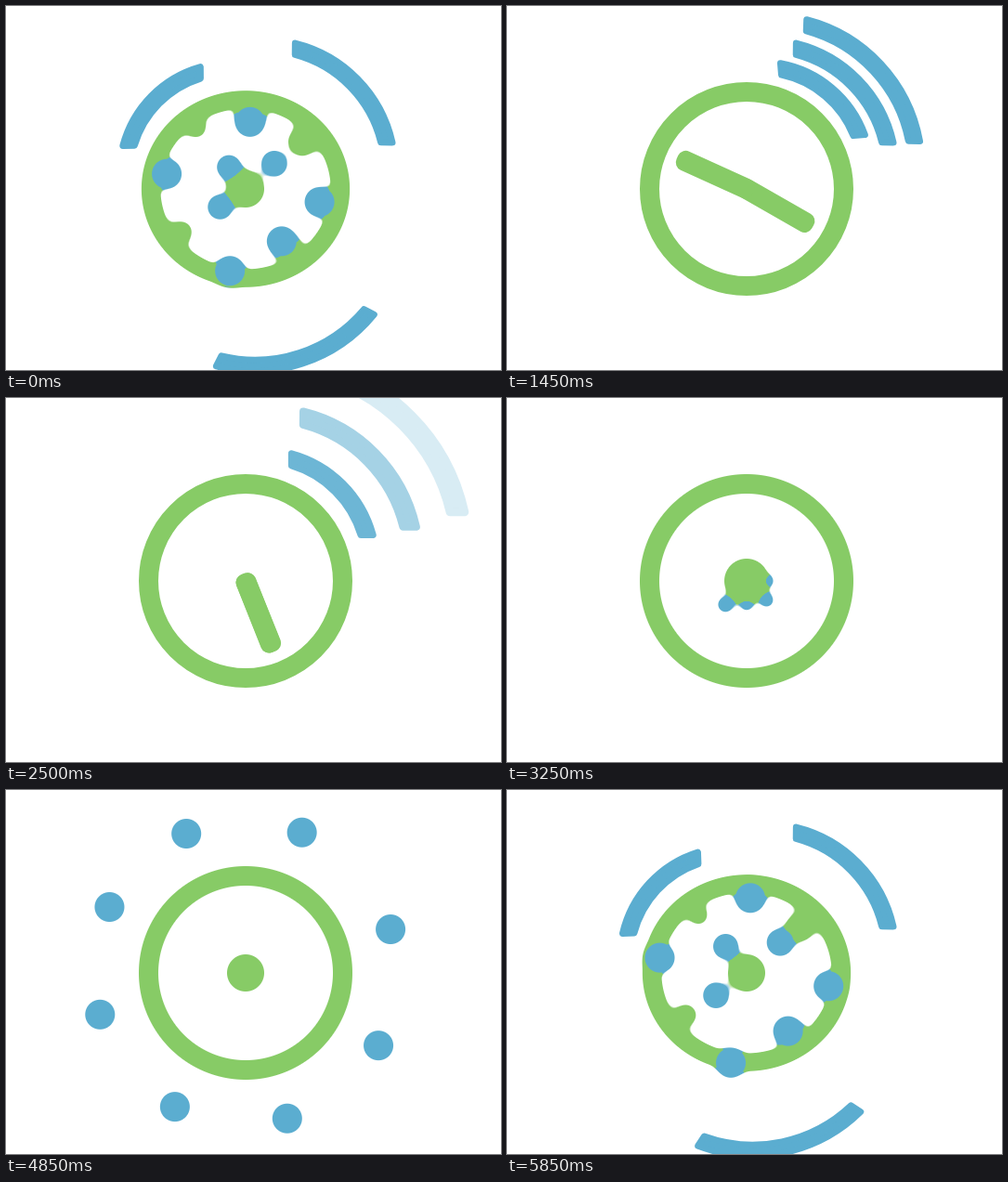
These frames come from a looping animation (533x392 px, 5900 ms). An HTML page with a canvas:

```html
<!DOCTYPE html>
<html lang="en">
<head>
<meta charset="utf-8">
<title>Clock and signal loop</title>
<style>
  html, body { margin: 0; width: 100%; height: 100%; overflow: hidden; background: #fff; }
  canvas { display: block; }
</style>
</head>
<body>
<canvas id="stage" width="533" height="392"></canvas>
<script>
const LOOP = 5900, CX = 258, CY = 197, ORBIT = 163;
const GREEN = [135, 203, 102], BLUE = [91, 173, 208];
const css = c => `rgb(${c})`;
const ctx = document.getElementById('stage').getContext('2d');

// Layer for the liquid shapes, centred on the clock.
const HALF = 190, SIZE = HALF * 2;
const layer = document.createElement('canvas');
layer.width = layer.height = SIZE;
const layerCtx = layer.getContext('2d');
const image = layerCtx.createImageData(SIZE, SIZE);

const clamp = v => v < 0 ? 0 : v > 1 ? 1 : v;
const ramp = (t, a, b) => clamp((t - a) / (b - a));
const ease = u => (1 - Math.cos(Math.PI * clamp(u))) / 2;
const rad = deg => deg * Math.PI / 180;

function smin(a, b, k) {
  const h = k - Math.abs(a - b);
  return Math.min(a, b) - (h > 0 ? h * h / (4 * k) : 0);
}

// angle; leaving: start, duration, ring bump radius and size; returning: start, bump size
const DOTS = [
  [352.1, 3150, 1150, 96, 9, 4904, 15],
  [43.5, 3150, 1010, 97, 9, 5147, 10],
  [88.9, 3150, 1010, 104, 0, 5074, 10],
  [134.3, 3050, 1080, 99, 14, 5200, 10],
  [178.1, 2900, 1500, 90, 11, 4852, 11],
  [224.3, 3030, 1080, 116, 12, 5180, 10],
  [266.1, 2960, 1120, 104, 0, 4821, 9],
  [307.2, 3130, 1125, 104, 19, 5097, 10]
].map(([angle, out, outTime, bumpR, bumpSize, back, backBump]) =>
  ({ angle, out, outTime, bumpR, bumpSize, back, backBump }));
const BACK_TIME = 1500;

const polar = (deg, r) => [Math.sin(rad(deg)) * r, -Math.cos(rad(deg)) * r];

// Stickiness: loose inside, tight while crossing the ring, long threads outside.
const stick = (r, size) =>
  Math.min(14, size * 1.6) - 6 * ramp(r, 70, 95) + 15 * ramp(r, 100, 118);

function liquidParts(t, sx, sy) {
  const tt = t < 1500 ? t + LOOP : t;
  const left = Math.max(0, 7 - tt / 1000);
  const turn = 66 - 7.85 * left * left;
  const dots = [], bumps = [];
  for (const d of DOTS) {
    const angle = d.angle + turn;
    const leaving = tt < 4600;
    let r, size, bumpR, bumpSize;
    if (leaving) {
      if (tt < d.out) continue;
      r = 10 + (ORBIT - 10) * ease((tt - d.out) / d.outTime);
      size = Math.min(16, r * 0.23);
      bumpR = d.bumpR;
      bumpSize = d.bumpSize * ramp(r, 80, 105) * (1 - ramp(tt, 4120, 4350));
    } else {
      const u = (tt - d.back) / BACK_TIME;
      if (u >= 1) continue;
      r = ORBIT * (1 - ease(u));
      size = Math.min(16, 10.5 + 0.08 * r);
      bumpR = r < 50 ? 104 - 0.5 * r : 79 + 0.46 * (r - 50);
      bumpSize = d.backBump * (1 - ramp(r, 70, 95)) * clamp(r / 28);
    }
    const [x, y] = polar(angle, r);
    const dot = { x, y, size, k: stick(r, size) };
    if (leaving && r > 112 && r < 158) [dot.tx, dot.ty] = polar(angle, r - 16);
    dots.push(dot);
    if (bumpSize > 0.5) {
      const [bx, by] = polar(angle, bumpR);
      bumps.push({ x: bx * sx, y: by * sy, size: bumpSize });
    }
  }
  return { dots, bumps };
}

function drawLiquid(t, hub, squash) {
  const sx = 1 - 0.025 * squash, sy = 1 - 0.08 * squash;
  const { dots, bumps } = liquidParts(t, sx, sy);
  const px = image.data;
  let i = 0;
  for (let row = 0; row < SIZE; row++) {
    const y = row - HALF + 0.5;
    for (let col = 0; col < SIZE; col++, i += 4) {
      const x = col - HALF + 0.5;
      const ex = x / sx, ey = y / sy;
      let ring = Math.abs(Math.sqrt(ex * ex + ey * ey) - 104.5) - 10.5;
      for (const b of bumps) {
        const dx = x - b.x, dy = y - b.y;
        if (dx > 45 || dx < -45 || dy > 45 || dy < -45) continue;
        ring = smin(ring, Math.sqrt(dx * dx + dy * dy) - b.size, 16);
      }
      const core = hub > 0 ? Math.sqrt(x * x + y * y) - hub : 999;
      let all = Math.min(ring, core), near = 999;
      for (const d of dots) {
        const dx = x - d.x, dy = y - d.y;
        if (dx > 45 || dx < -45 || dy > 45 || dy < -45) continue;
        let dist = Math.sqrt(dx * dx + dy * dy) - d.size;
        if (d.tx !== undefined) dist = smin(dist, Math.hypot(x - d.tx, y - d.ty) - 3, 8);
        all = smin(all, dist, d.k);
        if (dist < near) near = dist;
      }
      const alpha = clamp(0.5 - all);
      px[i + 3] = alpha * 255;
      if (!alpha) continue;
      const mix = clamp(0.5 + Math.min(core, Math.max(ring, 0)) - near);
      for (let c = 0; c < 3; c++) px[i + c] = GREEN[c] + (BLUE[c] - GREEN[c]) * mix;
    }
  }
  layerCtx.putImageData(image, 0, 0);
  ctx.drawImage(layer, CX - HALF, CY - HALF);
}

function drawPlain(hub) {
  ctx.strokeStyle = ctx.fillStyle = css(GREEN);
  ctx.lineWidth = 21;
  ctx.beginPath();
  ctx.arc(CX, CY, 104.5, 0, Math.PI * 2);
  ctx.stroke();
  ctx.beginPath();
  ctx.arc(CX, CY, hub, 0, Math.PI * 2);
  ctx.fill();
}

function drawHand(deg, length) {
  ctx.save();
  ctx.translate(CX, CY);
  ctx.rotate(rad(deg));
  ctx.fillStyle = css(GREEN);
  ctx.beginPath();
  ctx.roundRect(-11, -82 * length, 22, 82 * length + 8, 9);
  ctx.fill();
  ctx.restore();
}

// Band with its ends cut parallel to the axes of its quarter;
// it curves a little tighter than its distance from the clock.
function drawBand(dist, cut, middle, scale, alpha) {
  if (alpha <= 0) return;
  const join = 7, half = 9.5 - join / 2, edge = cut + join / 2;
  const r = dist * 0.85, shift = dist * 0.17 * Math.SQRT1_2;
  const outer = r + half, inner = r - half;
  const a = Math.asin(edge / outer), b = Math.asin(edge / inner), q = Math.PI / 2;
  ctx.save();
  ctx.translate(CX, CY);
  ctx.rotate(rad(middle - 45));
  ctx.scale(scale, scale);
  ctx.translate(shift, -shift);
  ctx.beginPath();
  ctx.arc(0, 0, outer, a - q, -a);
  ctx.arc(0, 0, inner, -b, b - q, true);
  ctx.closePath();
  ctx.fillStyle = ctx.strokeStyle = css(BLUE.map(c => Math.round(255 + (c - 255) * alpha)));
  ctx.lineWidth = join;
  ctx.lineJoin = 'round';
  ctx.fill();
  ctx.stroke();
  ctx.restore();
}

function drawSignal(t) {
  if (t > 3020 && t < 5500) return;
  const fadeIn = t > 5000 ? ramp(t, 5500, 5800) : 1;
  const fadeOut = t < 5000 ? 1 - ramp(t, 2650, 3020) : 1;
  const s = Math.max(-250, t > 5000 ? t - LOOP : t);
  const small = 45 - 97 * (1 - ease((s + 350) / 2100));
  const large = 45 + 117 * Math.pow(Math.max(0, 1 - s / 1600), 1.7);
  const bands = [[134, 28, small, 2158], [160, 29, 45.6, 1810], [188, 32, large, 1600]];
  for (const [dist, cut, middle, start] of bands) {
    const age = Math.max(0, s - start);
    const grow = 3.42e-7 * age * age;
    drawBand(dist, cut, middle, 1 + grow, clamp(1 - 2.75 * grow) * fadeIn * fadeOut);
  }
}

function hubRadius(t) {
  if (t < 2000) return 20 * (1 - ramp(t, 700, 1000));
  return 24 * ramp(t, 2900, 3200) - 4 * ramp(t, 3250, 3700);
}

function draw(t) {
  ctx.fillStyle = '#fff';
  ctx.fillRect(0, 0, 533, 392);
  drawSignal(t);
  const hub = hubRadius(t);
  if (t < 800 || t > 2940) {
    const squash = t < 1000 ? 1 - ease(ramp(t, 300, 780)) : ease(ramp(t, 5250, 5750));
    drawLiquid(t, hub, squash);
  } else {
    drawPlain(hub);
  }
  const length = ease(ramp(t, 700, 1000)) * (1 - ease(ramp(t, 2900, 3150)));
  if (length > 0) {
    drawHand(119.7 + 0.0365 * (t - 1450), length);
    drawHand(294 + 0.556 * (t - 1450), length);
  }
}

const begin = performance.now();
function frame() {
  draw((performance.now() - begin) % LOOP);
  requestAnimationFrame(frame);
}
frame();
</script>
</body>
</html>
```
